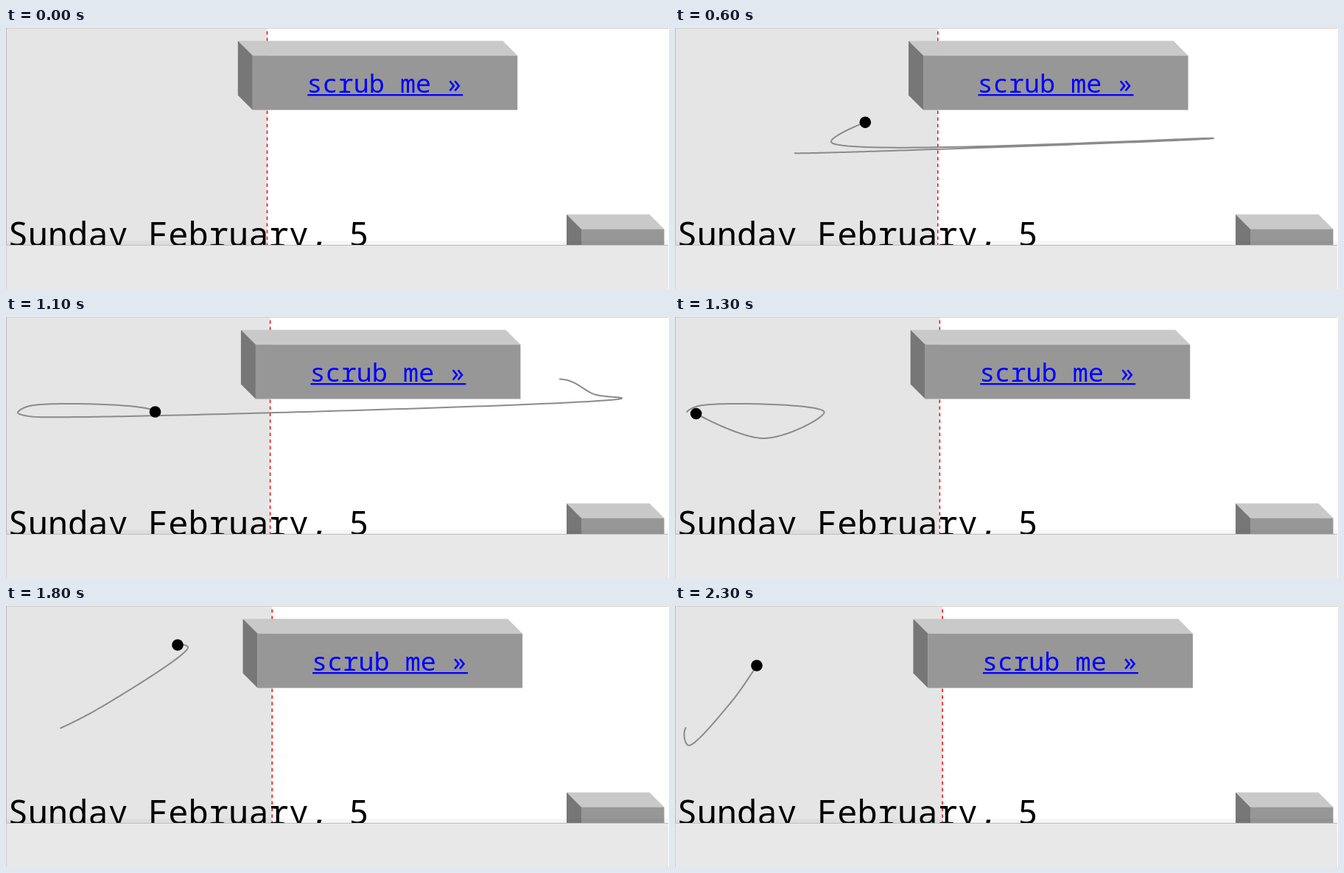
Write an HTML page with a canvas that moves like this. It is 900x355 px and loops after 2400 ms.

```html
<!DOCTYPE html>
<html lang="en">
<head>
<meta charset="utf-8">
<title>Scrub me</title>
<style>
html, body { margin: 0; width: 100%; height: 100%; overflow: hidden; background: #fff; }
canvas { display: block; width: 900px; height: 355px; }
</style>
</head>
<body>
<canvas id="stage" width="900" height="355"></canvas>
<script>
const ctx = document.getElementById('stage').getContext('2d');
const LOOP = 2400, STEP = 100, TAIL = 250, FLOOR = 295;
const MONO = '"Noto Sans Mono", "Liberation Mono", monospace';

// Pointer path: [ms, x, y]
const path = [
  [100, 308, 14], [150, 293, 32], [210, 262, 72], [290, 212, 149],
  [320, 186, 166.5], [350, 162, 170], [400, 208.5, 169.5],
  [500, 731, 150], [550, 212, 155], [605, 262, 127], [625, 274, 125.5],
  [700, 197, 217], [710, 193, 225], [720, 206, 226], [800, 431.5, 201],
  [850, 751, 84.5], [920, 800, 105.5], [960, 836, 110.5],
  [1030, 100, 136], [1043, 28, 134.5], [1050, 16, 130], [1062, 32, 121], [1100, 202.5, 129],
  [1225, 120, 165], [1350, -4, 109], [1390, 9, 106.5], [1450, 13, 158],
  [1490, 22, 181.5], [1540, 62, 171], [1600, 138.5, 132],
  [1750, 247, 56], [1800, 233, 53], [1930, 239, 99.5], [2000, 249, 99],
  [2050, 15, 165], [2080, 18, 189.5], [2200, 76, 131], [2300, 111, 81]
];

// Centripetal spline through the path
function pointAt(t) {
  const last = path.length - 1;
  let i = 0;
  while (i < last - 1 && path[i + 1][0] <= t) i++;
  const p = [-1, 0, 1, 2].map(d => path[Math.max(0, Math.min(last, i + d))]);
  const k = [0];
  for (let j = 1; j < 4; j++) {
    const gap = Math.hypot(p[j][1] - p[j - 1][1], p[j][2] - p[j - 1][2]);
    k[j] = k[j - 1] + Math.max(0.01, Math.sqrt(gap));
  }
  const f = (t - p[1][0]) / (p[2][0] - p[1][0]);
  const u = k[1] + Math.max(0, Math.min(1, f)) * (k[2] - k[1]);
  const mix = (a, b, lo, hi) => a + (b - a) * (u - lo) / (hi - lo);
  return [1, 2].map(c => {
    const a = [0, 1, 2].map(j => mix(p[j][c], p[j + 1][c], k[j], k[j + 1]));
    const b = [0, 1].map(j => mix(a[j], a[j + 1], k[j], k[j + 2]));
    return mix(b[0], b[1], k[1], k[2]);
  });
}

function rect(color, x, y, w, h) {
  ctx.fillStyle = color;
  ctx.fillRect(x, y, w, h);
}

function face(color, ...pts) {
  ctx.fillStyle = color;
  ctx.beginPath();
  pts.forEach(([x, y]) => ctx.lineTo(x, y));
  ctx.fill();
}

function block(x, y, w, h) {
  const d = 20;
  face('#c9c9c9', [x, y], [x + w, y], [x + w + d, y + d], [x + d, y + d]);
  face('#777', [x, y], [x + d, y + d], [x + d, y + d + h], [x, y + h]);
  rect('#979797', x + d, y + d, w, h);
}

function text(str, x, y, size, weight, color) {
  ctx.font = `${weight} ${size}px ${MONO}`;
  ctx.fillStyle = color;
  ctx.fillText(str, x, y);
}

function pointer(t) {
  const start = path[0][0];
  if (t < start) return;
  ctx.strokeStyle = '#8b8b8b';
  ctx.lineWidth = 2;
  ctx.lineJoin = 'round';
  ctx.beginPath();
  for (let s = Math.max(start, t - TAIL); s <= t; s++) ctx.lineTo(...pointAt(s));
  ctx.stroke();
  ctx.fillStyle = '#000';
  ctx.beginPath();
  ctx.arc(...pointAt(t), 7.8, 0, Math.PI * 2);
  ctx.fill();
}

function draw(t) {
  const shift = t * 0.00375;
  const edge = 354.5 + shift, left = 314.8 + shift;
  rect('#fff', 0, 0, 900, 355);
  rect('#e5e5e5', 0, 0, edge, FLOOR);
  rect('#d2d2d2', 0, 0, 899, 1);
  rect('#bdbdbd', 0, 0, 1, FLOOR);

  ctx.save();
  ctx.beginPath();
  ctx.rect(0, 0, 900, FLOOR + 0.5);
  ctx.clip();
  ctx.strokeStyle = '#f00';
  ctx.lineWidth = 1.5;
  ctx.setLineDash([4.5, 4.5]);
  ctx.beginPath();
  ctx.moveTo(edge, 4.5);
  ctx.lineTo(edge, FLOOR);
  ctx.stroke();
  ctx.setLineDash([]);

  block(left, 17.5, 359.5, 74);
  text('scrub me »', left + 93.5, 87.5, 35.2, 300, '#00f');
  rect('#00f', left + 94.5, 90, 211, 2.3);
  text('Sunday February, 5', 2.4, 296.5, 45.4, 500, '#000');
  block(761, 253.5, 112.5, 60);
  rect('rgba(0,0,0,.035)', 0, 289.5, 899, 6);
  pointer(t);
  ctx.restore();

  rect('#e8e8e8', 0, FLOOR, 899, 60);
  rect('#bdbdbd', 0, FLOOR, 899, 1);
  rect('#d2d2d2', 0, FLOOR, 1, 60);
}

function tick() {
  const t = performance.now() % LOOP;
  draw(Math.floor(t / STEP) * STEP);
  requestAnimationFrame(tick);
}
tick();
</script>
</body>
</html>
```
